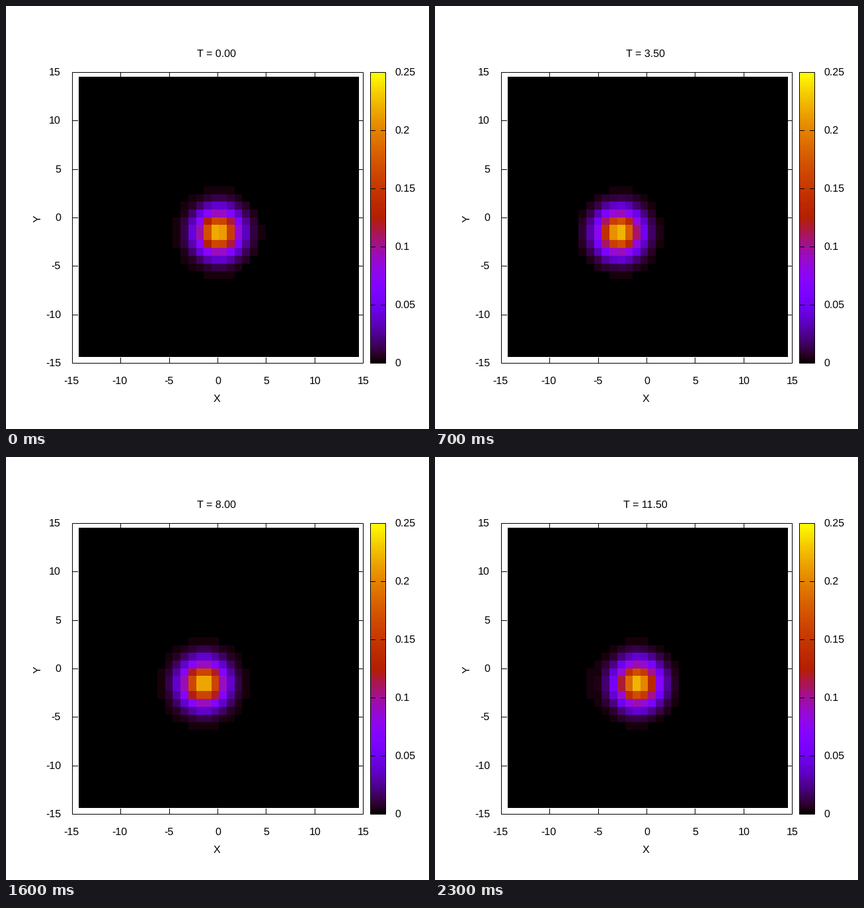
A matplotlib script that plays this animation: 640 by 640 pixels, repeating every 2400 ms.

```python
import numpy as np
import matplotlib.pyplot as plt
from matplotlib.animation import FuncAnimation
from matplotlib.patches import Rectangle

SIZE, DPI = 640, 100
FRAMES, INTERVAL, DT = 24, 100, 0.5
PX = 72 / DPI                      # one pixel in points
LEFT, SPAN = 100, 440              # plot box in pixels
UNIT = SPAN / 30                   # pixels per axis unit
CELL, CELLS = 11.755, 36           # heat map grid in pixels
GRID_X, GRID_Y = 110.41, 107.41
MID_Y = GRID_Y + 20 * CELL
VMAX, LEVELS = 0.25, 128
DECAY = 0.1553                     # packet falloff per squared cell

plt.rcParams["font.family"] = "Liberation Sans"
plt.rcParams["font.size"] = 16 * PX
plt.rcParams["text.hinting"] = "none"

fig = plt.figure(figsize=(SIZE / DPI, SIZE / DPI), dpi=DPI, facecolor="white")
ax = fig.add_axes([0, 0, 1, 1])
ax.axis("off")


def palette(level):
    g = np.clip(level / (LEVELS - 1), 0, 1)
    blue = np.clip(np.sin(2 * np.pi * g), 0, 1)
    return np.stack([np.sqrt(g), g ** 3, blue], axis=-1)


def cell_index(start, stop, origin):
    """Cell number of each pixel; edges overlap towards the stage centre."""
    edges = np.round(origin + CELL * np.arange(1, CELLS))
    edges += edges < SIZE / 2
    return np.searchsorted(edges, np.arange(start, stop), side="right")


cols = cell_index(110, 534, GRID_X)
rows = cell_index(107, 531, GRID_Y)
nodes = CELL * np.arange(CELLS + 1)


def profile(offset):
    """Gaussian at the grid nodes, averaged over each cell."""
    g = np.exp(-DECAY * offset ** 2)
    return (g[1:] + g[:-1]) / 2


def density(t):
    """Packet swinging in a harmonic well, with a faint tail growing late."""
    x = -1.44 + 1.5 * np.cos(0.985 * t)
    u = (GRID_X + nodes - LEFT - UNIT * (x + 15)) / CELL
    v = (GRID_Y + nodes - MID_Y) / CELL
    tail = 0.009 * (t / 11.5) ** 4 * np.exp(-((u[:-1] + 6.7) / 0.45) ** 2)
    return 0.25 * np.outer(profile(v), profile(u) + tail)


def field(t):
    rgb = palette(np.floor(density(t) / VMAX * LEVELS))
    return rgb[rows][:, cols]


def line(x0, y0, x1, y1):
    ax.plot([x0, x1], [y0, y1], color="black", lw=PX, snap=False,
            solid_capstyle="butt", zorder=3)


def box(x, y, w, h):
    ax.add_patch(Rectangle((x + 0.5, y + 0.5), w, h, fill=False, ec="black",
                           lw=PX, snap=False, zorder=4))


def label(x, y, s, ha="center", **kw):
    return ax.text(x, y, s, ha=ha, va=kw.pop("va", "baseline"), color="black", **kw)


heat = ax.imshow(field(0), extent=(110, 534, 531, 107),
                 interpolation="nearest", aspect="auto", zorder=1)

bar = np.floor((SPAN - np.arange(SPAN) - 0.5) / SPAN * LEVELS)
ax.imshow(palette(bar)[:, None, :], extent=(551, 575, 540, 100),
          interpolation="nearest", aspect="auto", zorder=1)

box(LEFT, LEFT, SPAN, SPAN)
box(551, LEFT, 23, SPAN)

for value in range(-15, 16, 5):
    x = round(LEFT + UNIT * (value + 15))
    y = round(LEFT + UNIT * (15 - value))
    if abs(value) < 15:
        line(x + 0.5, 100, x + 0.5, 109)
        line(x + 0.5, 532, x + 0.5, 541)
        line(100, y + 0.5, 109, y + 0.5)
        line(532, y + 0.5, 541, y + 0.5)
    shift = len(str(value)) - 1 if value < 0 else 0
    label(x + 0.5 - shift, 572, str(value))
    label(83, y + 5, str(value), ha="right")

for i in range(6):
    y = round(540 - SPAN * i / 5)
    if 0 < i < 5:
        line(551, y + 0.5, 559, y + 0.5)
        line(567, y + 0.5, 575, y + 0.5)
    label(588, y + 5, f"{i * 0.05:.2g}", ha="left")

label(318.5, 599, "X")
label(48.5, 322, "Y", va="center", rotation=90)
title = label(318.3, 77, "T = 0.00")

ax.set_xlim(0, SIZE)
ax.set_ylim(SIZE, 0)


def update(n):
    t = n * DT
    heat.set_data(field(t))
    title.set_text(f"T = {t:.2f}")
    return heat, title


anim = FuncAnimation(fig, update, frames=FRAMES, interval=INTERVAL,
                     repeat=True, repeat_delay=0, blit=False)
plt.show()
```
